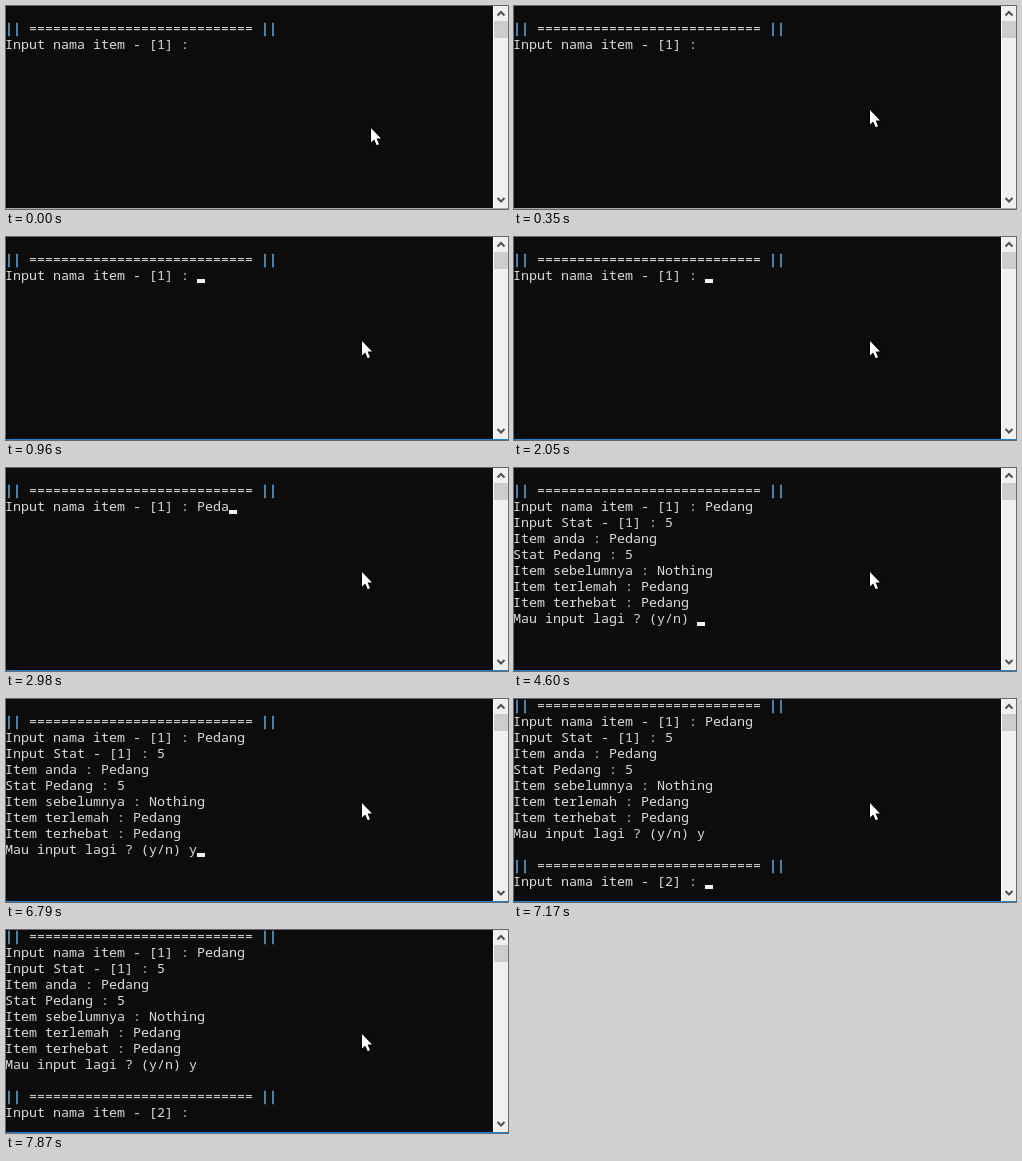
Write an HTML page that moves like this. It is 502 px wide and 203 px high and loops after 8 s.

```html
<!DOCTYPE html>
<html>
<head>
<meta charset="utf-8">
<style>
html, body { margin: 0; width: 100%; height: 100%; overflow: hidden; background: #0c0c0c; }
svg { display: block; }
text { font: 13.333px "Noto Sans Mono", "DejaVu Sans Mono", monospace; fill: #dcdcdc; white-space: pre; }
.bar { fill: #62a8e0; stroke: #62a8e0; stroke-width: 0.5; }
</style>
</head>
<body>
<svg width="502" height="203" viewBox="0 0 502 203">
  <rect width="502" height="203" fill="#0c0c0c"/>
  <g id="screen"></g>
  <rect id="caret" width="8" height="4" fill="#f2f2f2"/>
  <rect x="487" width="15" height="202" fill="#f0f0f0"/>
  <rect x="487" width="1" height="202" fill="#fff"/>
  <rect x="488" y="15" width="14" height="17" fill="#cdcdcd"/>
  <path d="M491.500 9.500 495 6 498.500 9.500M491.500 192 495 195.500 498.500 192" fill="none" stroke="#505050" stroke-width="2"/>
  <rect id="edge" y="202" width="502" height="1"/>
  <path id="mouse" d="M0 0V14.500L3.200 11.500 5.700 17.200 8 16.200 5.600 10.600H10Z" fill="#fff" stroke="#000" stroke-width="2" paint-order="stroke"/>
</svg>
<script>
const $ = id => document.getElementById(id);
const rule = `|| ${"=".repeat(28)} ||\n`;
const ask = n => `${rule}Input nama item - [${n}] : `;
const stat = ask(1) + "Pedang\nInput Stat - [1] : ";
const result = stat + `5
Item anda : Pedang
Stat Pedang : 5
Item sebelumnya : Nothing
Item terlemah : Pedang
Item terhebat : Pedang
Mau input lagi ? (y/n) `;

// time, console text, caret visible
const typing = [
  [0, ask(1), 0],
  [960, ask(1), 1],
  [1510, ask(1), 0],
  [2050, ask(1), 1],
  [2520, ask(1) + "P", 1],
  [2660, ask(1) + "P", 0],
  [2750, ask(1) + "Pe", 1],
  [2980, ask(1) + "Peda", 1],
  [3130, ask(1) + "Pedan", 1],
  [3300, ask(1) + "Pedang", 1],
  [3590, stat, 1],
  [4140, stat, 0],
  [4230, stat + "5", 1],
  [4600, result, 1],
  [5240, result, 0],
  [5780, result, 1],
  [6160, result + "y", 1],
  [6240, result + "y", 0],
  [6790, result + "y", 1],
  [7170, result + "y\n\n" + ask(2), 1],
  [7870, result + "y\n\n" + ask(2), 0]
];
// time, pointer tip
const moves = [[0, 365, 122], [70, 362, 118], [120, 359, 115], [260, 358, 109], [350, 356, 104]];
const at = (steps, t) => steps.findLast(s => s[0] <= t);

let shown;
function print(text) {
  if (text === shown) return;
  shown = text;
  const lines = text.split("\n");
  const top = lines.length > 10 ? 11 : 27;
  $("screen").innerHTML = lines.map((line, i) =>
    `<text x="-1" y="${top + 16 * i}">${line.replace(/\|\|/g, '<tspan class="bar">||</tspan>')}</text>`
  ).join("");
  $("caret").setAttribute("x", 8 * lines.at(-1).length - 1);
  $("caret").setAttribute("y", top + 16 * lines.length - 17);
}

function draw(now) {
  const t = now % 8000;
  const [, text, caret] = at(typing, t);
  const [, x, y] = at(moves, t);
  print(text);
  $("caret").setAttribute("opacity", caret);
  $("mouse").setAttribute("transform", `translate(${x} ${y})`);
  $("edge").setAttribute("fill", t < 500 ? "#aaa" : "#1883d7");
  requestAnimationFrame(draw);
}
draw(0);
</script>
</body>
</html>
```
